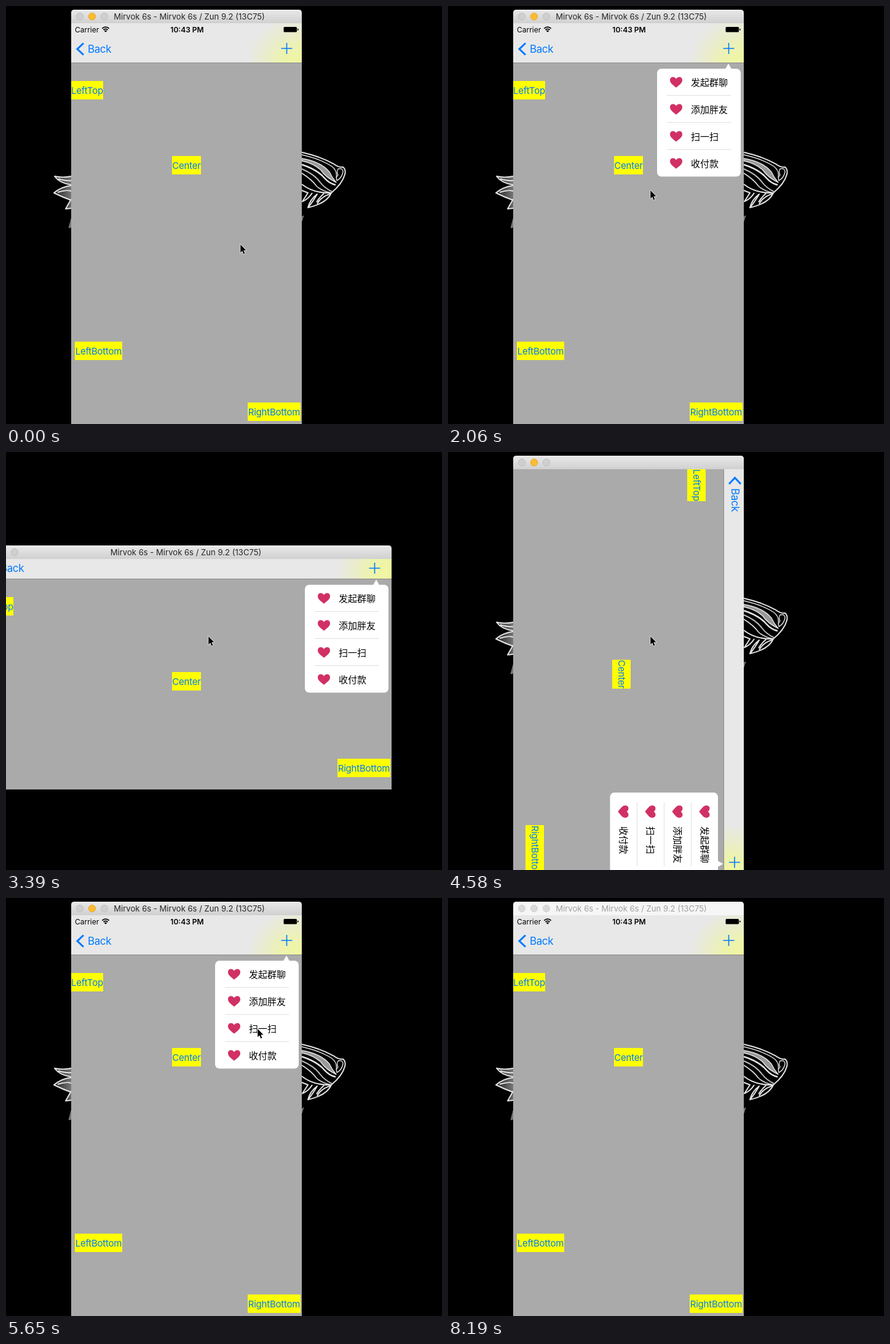
Animation, 709 px wide and 680 px high, one loop 8250 ms. Source, as an HTML page:

```html
<!DOCTYPE html>
<html lang="en">
<head>
<meta charset="utf-8">
<title>Popup menu with device rotation</title>
<style>
  html, body { margin: 0; width: 100%; height: 100%; overflow: hidden; background: #000; }
  svg { display: block; width: 709px; height: 680px; font-family: Inter, Roboto, sans-serif; }
  .tag { font-size: 15px; letter-spacing: -.22px; fill: #007aff; text-anchor: middle; }
  .back { font-size: 17px; letter-spacing: -.4px; fill: #007aff; }
  .item { font: 15px "Noto Sans CJK SC", "Noto Sans CJK", sans-serif; }
  .sketch { fill: none; stroke: #e2e2e2; stroke-width: 2; stroke-linejoin: round; }
</style>
</head>
<body>
<svg viewBox="0 0 709 680">
  <defs>
    <linearGradient id="chrome" x2="0" y2="1">
      <stop stop-color="#e9e9e9"/><stop offset="1" stop-color="#d0d0d0"/>
    </linearGradient>
    <radialGradient id="glow" gradientUnits="userSpaceOnUse" r="85">
      <stop stop-color="#f1f79f"/><stop offset=".3" stop-color="#eef4a9"/>
      <stop offset=".65" stop-color="#eaedca"/><stop offset="1" stop-color="#e8e8e8"/>
    </radialGradient>
    <linearGradient id="leaf">
      <stop stop-color="#222"/><stop offset="1" stop-color="#777"/>
    </linearGradient>
    <clipPath id="clip"><rect id="clipRect"/></clipPath>
  </defs>
  <rect width="709" height="680"/>

  <g class="sketch">
    <path d="M481 238Q512 245 533 257Q541 263 548 262Q553 266 551 274Q547 289 529 304"/>
    <path d="M481 242Q512 249 530 261Q539 268 537 279" stroke-width="1.3"/>
    <path d="M540 265q8-2 8 5q-2 10-10 14q-2-6 2-9q-3-5 0-10z" stroke-width="1.4"/>
    <path d="M481 248Q512 253 526 270Q530 279 537 287Q520 279 512 267Q500 256 481 252z" fill="#999" stroke-width="1.4"/>
    <path d="M481 258Q506 266 518 280Q526 289 536 291" stroke-width="2.6"/>
    <path d="M481 265Q502 274 511 287Q518 296 530 302" stroke="#bbb"/>
    <path d="M481 272Q497 282 505 293Q513 301 529 304" stroke-width="1.6"/>
    <path d="M481 290Q500 305 529 304Q522 321 491 328Q494 315 506 306Q498 320 491 328M481 300l10 4-9 14q10-4 16-14M529 305Q512 310 506 322M517 305Q510 311 505 319"/>
    <g fill="url(#leaf)">
      <path d="M106 277Q92 280 79 277Q87 288 106 291M85 281Q97 285 106 284"/>
      <path d="M106 292Q90 294 78 304Q92 311 106 316M84 303Q97 299 106 301"/>
      <path d="M106 314Q101 323 97 330L106 329"/>
    </g>
    <path d="M106 346L102 361L106 360zM481 343l3-2-3 9z" fill="#777" stroke="#777" stroke-width="1"/>
  </g>

  <g id="win">
    <path id="bar"/>
    <g id="lights"></g>
    <text id="title" y="16" font-size="13.1" text-anchor="middle">Mirvok 6s - Mirvok 6s / Zun 9.2 (13C75)</text>
  </g>

  <g clip-path="url(#clip)">
    <rect width="709" height="680"/>
    <g id="screen">
      <rect id="page" fill="#aaa"/>
      <g id="tags"></g>
      <rect id="nav" fill="url(#glow)"/>
      <rect id="navLine" height="1" fill="#8b8b8b"/>
      <g id="status">
        <text x="6" y="15" font-size="12">Carrier</text>
        <path d="M50.3 8.7Q56 3.6 61.7 8.7M52.5 11Q56 7.8 59.5 11" fill="none" stroke="#000" stroke-width="1.7"/>
        <path d="M53.7 12.4Q56 10.4 58.3 12.4L56 14.7z"/>
        <text x="188.5" y="15" font-size="12" font-weight="600" text-anchor="middle">10:43 PM</text>
        <rect x="345.5" y="6" width="21.5" height="8.5" rx="1.5"/>
        <path d="M368 8.5q1.6 0 1.6 1.8t-1.6 1.8z"/>
      </g>
      <g id="back">
        <path d="M20 32.5L10 42L20 51.5" fill="none" stroke="#007aff" stroke-width="3"/>
        <text class="back" x="27" y="48">Back</text>
      </g>
      <path id="plus" d="M-9 0H9M0-9V9" stroke="#007aff" stroke-width="1.6"/>
      <g id="menu"></g>
    </g>
  </g>

  <g id="cursor">
    <path d="M.3 1V14.2L3.3 11.4L5.4 16.4L7.4 15.6L5.3 10.6H9.5z"
          stroke="#fff" stroke-width="1.4" stroke-linejoin="round" paint-order="stroke"/>
  </g>
</svg>
<script>
const LOOP = 8250;
const $ = id => document.getElementById(id);
const set = (el, attrs) => { for (const k in attrs) el.setAttribute(k, attrs[k]); };
const lerp = (a, b, k) => a + (b - a) * k;
const clamp = v => Math.min(1, Math.max(0, v));
const smooth = k => k * k * (3 - 2 * k);

// Number of screen updates done so far in a burst of n, counted from 0.
const ticks = (t, start, end, n) =>
  t < start ? 0 : Math.min(n, Math.floor((t - start) / (end - start) * (n - 1) + .05) + 1);

// Yellow buttons; y is measured from the nav bar, or from the bottom edge when `low`.
const tags = [
  { label: 'LeftTop', w: 52, x: 0, y: 30 },
  { label: 'Center', w: 47, x: -23.5, y: 152, anchor: .5 },
  { label: 'LeftBottom', w: 77, x: 6, y: 454 },
  { label: 'RightBottom', w: 86, x: -88, y: -50, anchor: 1, low: true }
];
$('tags').innerHTML = tags.map(g =>
  `<g><rect width="${g.w}" height="30" fill="#ff0"/><text class="tag" x="${g.w / 2}" y="20.5">${g.label}</text></g>`).join('');

const heart = 'M0 8.7C-5 4.5-10 1.5-10-3.3C-10-9.3-3-10.2 0-5.6C3-10.2 10-9.3 10-3.3C10 1.5 5 4.5 0 8.7z';
$('menu').innerHTML =
  '<path d="M111 .5L116-8.5L121 .5z" fill="#fff"/><rect width="136" height="175.5" rx="7" fill="#fff"/>' +
  ['发起群聊', '添加胖友', '扫一扫', '收付款'].map((label, i) =>
    `<g transform="translate(0 ${i * 44})">
      <path d="${heart}" transform="translate(31 22)" fill="#d13064"/>
      <text class="item" x="55" y="27.5">${label}</text>
      ${i < 3 ? '<rect x="16" y="43" width="104" height="1" fill="#e0e0e0"/>' : ''}
    </g>`).join('');

$('lights').innerHTML = [14, 34, 54].map(x =>
  `<circle cx="${x}" cy="11" r="5.7" stroke-width=".8"/>`).join('');

// Cursor moves: [start, end, updates, control x, control y, x, y]
const home = [381, 387];
const moves = [
  [140, 880, 6, 295, 230, 448, 72],
  [1620, 2060, 4, 400, 230, 329, 299],
  [5050, 5500, 4, 380, 290, 415, 221],
  [5650, 5651, 1, 412, 216, 409, 212],
  [6240, 6530, 3, 425, 300, 424, 395],
  [7280, 7860, 5, 590, 470, 690, 720]
];
function cursorAt(t) {
  let [x, y] = home;
  for (const [start, end, n, cx, cy, ex, ey] of moves) {
    const s = ticks(t, start, end, n) / n, r = 1 - s;
    x = r * r * x + 2 * r * s * cx + s * s * ex;
    y = r * r * y + 2 * r * s * cy + s * s * ey;
    if (s < 1) break;
  }
  return [x, y];
}

function turn(t, start, end) {
  return smooth(clamp((ticks(t, start, end, 4) - 1) / 3));
}

function drawWindow(t, wide) {
  const active = t < 8190;
  const [x, y, w, h] = wide ? [-40, 152, 667, 375] : [106, 6, 375, 667];
  set($('win'), { transform: `translate(${x} ${y})` });
  set($('bar'), {
    d: `M0 22V5Q0 0 5 0H${w - 5}Q${w} 0 ${w} 5V22z`,
    fill: active ? 'url(#chrome)' : '#f6f6f6'
  });
  [...$('lights').children].forEach((c, i) => {
    const lit = active && i === 1;
    set(c, {
      fill: lit ? '#fdbc2f' : active ? '#cfcfcf' : '#d9d9d9',
      stroke: lit ? '#dfa023' : active ? '#b9b9b9' : '#cfcfcf'
    });
  });
  set($('title'), {
    x: wide ? 332.5 : 192,
    fill: active ? '#262626' : '#a0a0a0',
    opacity: t >= 4580 && t < 4730 ? 0 : 1
  });
  set($('clipRect'), { x, y: y + 22, width: w, height: h });
}

function drawScreen(t, wide) {
  // k is 0 for the upright layout and 1 for the sideways one
  const k = turn(t, 2950, 3390) - turn(t, 4580, 5040);
  const angle = wide ? -90 * (1 - k) : 90 * k;
  const W = lerp(375, 667, k), H = lerp(667, 375, k), nav = lerp(64, 32, k);

  set($('screen'), { transform: `translate(293.5 361.5) rotate(${angle}) translate(${-W / 2} ${-H / 2})` });
  set($('page'), { width: W, height: H });
  set($('nav'), { width: W, height: nav });
  set($('navLine'), { y: nav, width: W });
  set($('glow'), { cx: W - 5, cy: lerp(72, 22, k) });
  set($('status'), { opacity: 1 - k });
  set($('back'), { transform: `translate(${4 * k} ${-27.5 * k})` });
  set($('plus'), {
    transform: `translate(${W - 24.5 - 3 * k} ${41 - 26 * k})`,
    opacity: t >= 1180 && t < 1330 ? .3 : 1
  });
  tags.forEach((g, i) => {
    const x = g.x + W * (g.anchor || 0), y = g.y + (g.low ? H : nav);
    set($('tags').children[i], { transform: `translate(${x} ${y})` });
  });

  // The menu grows from, and shrinks back to, the tip of its arrow
  const open = (ticks(t, 1330, 1470, 2) - ticks(t, 6095, 6240, 2)) / 2;
  set($('menu'), {
    transform: `translate(${W - 141} ${nav + 10}) translate(116 -8.5) scale(${lerp(.1, 1, open)}) translate(-116 8.5)`,
    opacity: open
  });
}

function render(t) {
  const wide = t >= 2950 && t < 4580;
  drawWindow(t, wide);
  drawScreen(t, wide);
  set($('cursor'), { transform: `translate(${cursorAt(t).join(' ')})` });
}

const begin = performance.now();
function frame() {
  render((performance.now() - begin) % LOOP);
  requestAnimationFrame(frame);
}
render(0);
requestAnimationFrame(frame);
</script>
</body>
</html>
```
